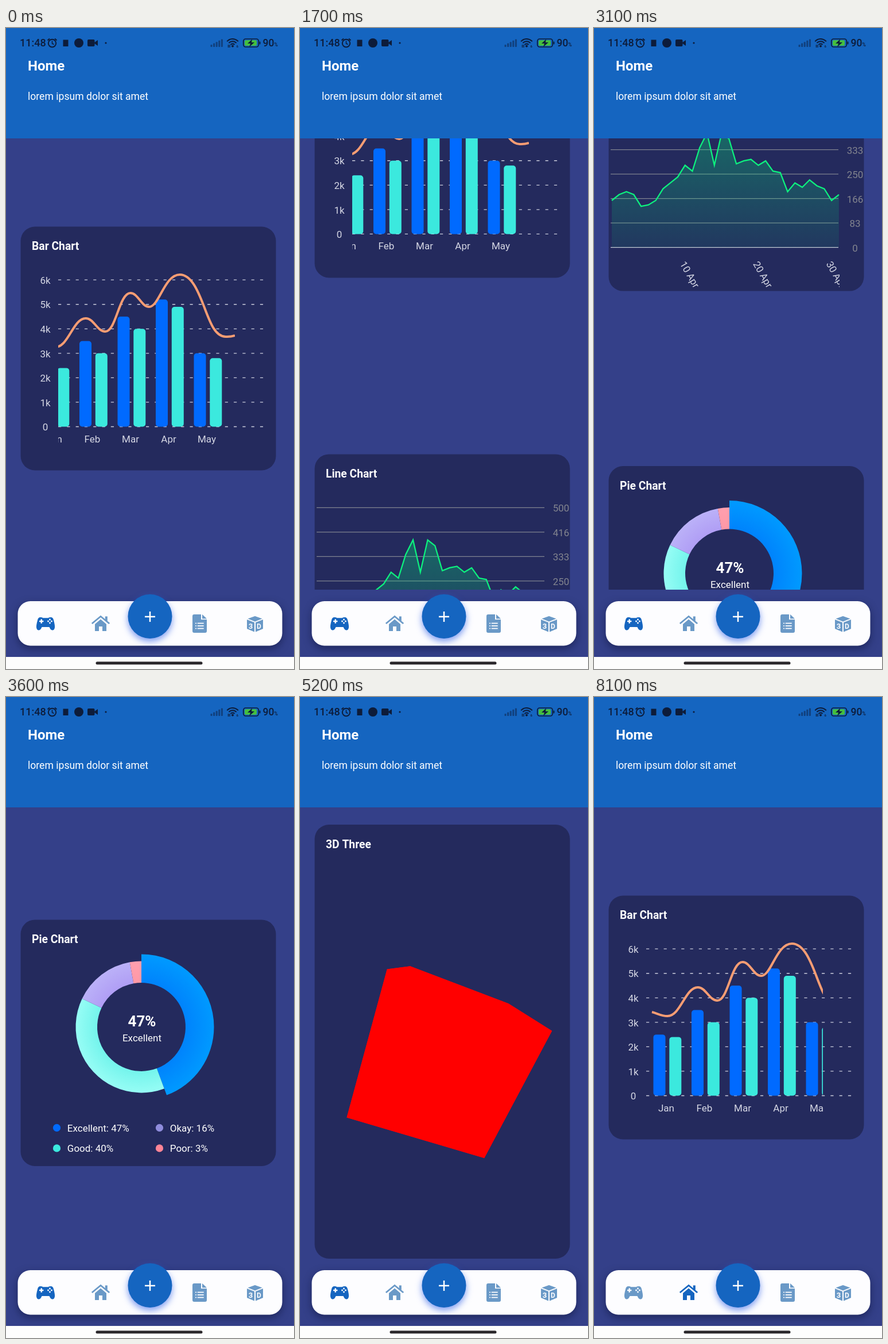
Write an HTML page with a canvas that moves like this. It is 502 px wide and 1115 px high and loops after 8200 ms.

```html
<!DOCTYPE html>
<html lang="en">
<head>
<meta charset="utf-8">
<title>Dashboard</title>
<style>
html, body { margin: 0; width: 100%; height: 100%; overflow: hidden; background: #344089; }
canvas { display: block; width: 502px; height: 1115px; }
</style>
</head>
<body>
<canvas id="stage"></canvas>
<script>
const W = 502, H = 1115, LOOP = 8200, STEP = 100;
const BG = '#344089', CARD = '#242a5d', BLUE = '#1565c0', IDLE = '#6a99c7';
const INK = '#0d1c3a', LABEL = '#d5d7e4', BAR_A = '#006aff', BAR_B = '#3be9de';
const VIEW_TOP = 192, VIEW_BOTTOM = 977, PAGE = 731, TAB_AT = 6700;

const canvas = document.getElementById('stage');
const dpr = window.devicePixelRatio || 1;
canvas.width = W * dpr;
canvas.height = H * dpr;
const c = canvas.getContext('2d');

const clamp = (v) => Math.max(0, Math.min(1, v));
const easeInOut = (u) => u * u * (3 - 2 * u);
const flick = (t, start, length) => 1 - Math.pow(1 - clamp((t - start) / length), 2.2);

function text(s, x, y, size, color, weight = 400, align = 'left') {
  c.font = `${weight} ${size}px Roboto, sans-serif`;
  c.textAlign = align;
  c.textBaseline = 'alphabetic';
  c.fillStyle = color;
  c.fillText(s, x, y);
}

function box(x, y, w, h, r, color) {
  c.beginPath();
  c.roundRect(x, y, w, h, r);
  c.fillStyle = color;
  c.fill();
}

function dot(x, y, r, color) {
  c.beginPath();
  c.arc(x, y, r, 0, Math.PI * 2);
  c.fillStyle = color;
  c.fill();
}

function poly(points, color) {
  c.beginPath();
  points.forEach(([x, y]) => c.lineTo(x, y));
  c.closePath();
  c.fillStyle = color;
  c.fill();
}

function line(points, color, width) {
  c.beginPath();
  points.forEach(([x, y]) => c.lineTo(x, y));
  c.strokeStyle = color;
  c.lineWidth = width;
  c.stroke();
}

function clipped(x, y, w, h, draw) {
  c.save();
  c.beginPath();
  c.rect(x, y, w, h);
  c.clip();
  draw();
  c.restore();
}

// Draws a card whose content uses coordinates relative to the card's top.
function card(top, height, title, draw) {
  if (top > VIEW_BOTTOM || top + height < VIEW_TOP) return;
  c.save();
  c.translate(0, top);
  box(25.5, 0, 445, height, 25, CARD);
  text(title, 45, 40.7, 19.3, '#fff', 700);
  draw();
  c.restore();
}

const MONTHS = [['Jan', 2.5, 2.4], ['Feb', 3.5, 3], ['Mar', 4.5, 4], ['Apr', 5.2, 4.9], ['May', 3, 2.8]];
const TREND = new Path2D(`M101 202.5 C110 204.5 117 209.5 128 209.5 C151 209.5 159 159.5 181 159.5
  C195 159.5 201 182.5 215 182.5 C234 182.5 239 115.5 259 115.5 C272 115.5 278 139.5 291.5 139.5
  C309 139.5 318 83.5 345 83.5 C366 83.5 378 115.5 387 138.5 C397 164.5 406 191.5 425 191.5
  Q433 192 441 189.5`);

function barChart(shift, grow) {
  const base = 348, unit = 42.55;
  for (let i = 0; i <= 6; i++) {
    const y = base - i * unit;
    c.setLineDash([5.2, 10.1]);
    line([[91, y], [449, y]], '#c9cbdb', 1.3);
    c.setLineDash([]);
    text(i ? i + 'k' : '0', 68.5, y + 6.7, 17, LABEL, 400, 'center');
  }
  clipped(91, 60, 308, 340, () => {
    c.translate(-shift, 0);
    MONTHS.forEach(([name, a, b], i) => {
      const x = 103.5 + i * 66.5;
      [[a, 0, BAR_A], [b, 27.8, BAR_B]].forEach(([v, dx, color]) => {
        const h = v * unit * grow;
        if (h > 0) box(x + dx, base - h, 21, h, Math.min(5, h / 2), color);
      });
      c.globalAlpha = clamp(grow * 2);
      text(name, x + 22.5, 375, 17, LABEL, 400, 'center');
      c.globalAlpha = 1;
    });
    c.strokeStyle = '#f89d73';
    c.lineWidth = 4;
    c.stroke(TREND);
  });
}

const SERIES = [160, 180, 190, 180, 140, 145, 160, 200, 220, 240, 280, 260, 340, 390, 280, 390,
  370, 285, 295, 300, 280, 295, 260, 255, 190, 220, 205, 230, 210, 200, 160, 180];

function lineChart() {
  const base = 348, scale = 0.51;
  const points = SERIES.map((v, i) => [31 + i * 12.77, base - v * scale]);
  for (let i = 0; i <= 6; i++) {
    const y = base - i * 42.5;
    line([[29, y], [426, y]], i ? '#7f8290' : '#c6c9d6', 1.4);
    text(String(Math.floor(i * 500 / 6)), 455, y + 7, 17, '#83858f', 400, 'center');
  }
  const fill = c.createLinearGradient(0, 148, 0, base);
  fill.addColorStop(0, 'rgba(0,240,120,.31)');
  fill.addColorStop(1, 'rgba(0,240,128,.07)');
  poly([...points, [points[31][0], base], [31, base]], fill);
  c.lineJoin = 'miter';
  line(points, '#0df07e', 2.3);
  clipped(29, 350, 399, 74, () => {
    ['10 Apr', '20 Apr', '30 Apr'].forEach((s, i) => {
      c.save();
      c.translate(166.5 + i * 127.5, 395.5);
      c.rotate(Math.PI / 3);
      text(s, 0, 5.5, 17, LABEL, 400, 'center');
      c.restore();
    });
  });
}

// label, share, inner colour, outer colour, outer radius, legend colour
const SLICES = [
  ['Excellent', 47, '#0083fc', '#009aff', 126.5, BAR_A],
  ['Good', 40, '#74f4ec', '#96fdf5', 114.5, BAR_B],
  ['Okay', 16, '#b09ef5', '#bbb1f8', 114.5, '#8f8cdc'],
  ['Poor', 3, '#ff98a6', '#ff9fae', 114.5, '#ff8496']
];

function pieChart() {
  const x = 236, y = 186.5;
  const total = SLICES.reduce((sum, s) => sum + s[1], 0);
  let from = -Math.PI / 2;
  SLICES.forEach(([name, share, inner, outer, r, key], i) => {
    const to = from + share / total * Math.PI * 2;
    const shade = c.createRadialGradient(x, y, 77, x, y, r);
    shade.addColorStop(0, inner);
    shade.addColorStop(1, outer);
    c.beginPath();
    c.arc(x, y, r, from, to);
    c.arc(x, y, 77, to, from, true);
    c.closePath();
    c.fillStyle = shade;
    c.fill();
    from = to;
    const lx = i < 2 ? 88.5 : 267.5, ly = 362 + (i % 2) * 35.5;
    dot(lx, ly, 6.6, key);
    text(`${name}: ${share}%`, lx + 18.3, ly + 6.3, 17, '#fff');
  });
  text('47%', x + 1, 186, 26, '#fff', 700, 'center');
  text('Excellent', x + 1, 211.5, 17, '#fff', 400, 'center');
}

function cube(t) {
  const a = 1.916 + 0.0006 * (Math.min(t, 6400) - 5200);
  const b = 1.567 - a;
  const sa = Math.sin(a), ca = Math.cos(a), sb = Math.sin(b), cb = Math.cos(b);
  const project = ([x, y, z]) => {
    const px = x * cb + z * sb, pz = z * cb - x * sb;
    const depth = 4 - (y * sa + pz * ca);
    return [248.5 + 425 * px / depth, 392 - 425 * (y * ca - pz * sa) / depth];
  };
  for (let axis = 0; axis < 3; axis++) {
    for (const side of [-1, 1]) {
      const face = [[-1, -1], [1, -1], [1, 1], [-1, 1]].map((corner) => {
        const p = [...corner];
        p.splice(axis, 0, side);
        return project(p);
      });
      poly(face, '#f00');
    }
  }
}

function statusBar() {
  text('11:48', 24, 32, 18, INK, 500);
  c.strokeStyle = INK;
  c.lineWidth = 2;
  c.beginPath();
  c.arc(80.5, 26.5, 6.7, 0, Math.PI * 2);
  c.stroke();
  line([[80.5, 22.5], [80.5, 27], [83.5, 28.5]], INK, 1.5);
  line([[72.5, 21.5], [76, 18.5]], INK, 2);
  line([[85, 18.5], [88.5, 21.5]], INK, 2);
  box(99.5, 20.5, 9, 11.5, 0, INK);
  dot(127, 26, 8, INK);
  box(142, 20, 12.5, 12, 2, INK);
  poly([[153, 26], [160, 21], [160, 31]], INK);
  dot(174, 26, 1.6, INK);

  for (let i = 0; i < 5; i++) {
    const h = 4 + i * 2.4;
    box(356.5 + i * 4.6, 33 - h, 3, h, 1, 'rgba(13,28,58,.5)');
  }
  for (const r of [4.5, 8.8, 13]) {
    c.beginPath();
    c.arc(395, 32, r, -Math.PI * 0.77, -Math.PI * 0.23);
    c.strokeStyle = INK;
    c.lineWidth = 2;
    c.stroke();
  }
  dot(395, 31.5, 2, INK);
  line([[387.5, 29], [387.5, 34]], INK, 1.3);
  line([[390, 29], [390, 34]], INK, 1.3);
  text('6', 401.5, 33.5, 6, INK, 500);
  c.beginPath();
  c.roundRect(413.8, 19, 26.5, 14, 4);
  c.strokeStyle = INK;
  c.lineWidth = 1.7;
  c.stroke();
  box(416, 21.2, 21, 9.6, 2, '#45bf3f');
  box(441.5, 23.5, 2, 5, 1, INK);
  poly([[429, 19.5], [421, 27], [426, 27], [424, 33], [433, 25], [428, 25]], INK);
  text('90', 447.5, 32, 17.5, INK, 500);
  text('%', 467.5, 32, 8.5, INK, 500);
}

const PAD = new Path2D(`M60 1025 Q63 1025 64.5 1026.3 H73.5 Q75 1025 78 1025 Q82 1025 83 1030
  Q85.5 1039 85 1043 Q84 1048 80.5 1047.5 Q77.5 1047 75.5 1042 H62.5 Q60.5 1047 57.5 1047.5
  Q54 1048 53 1043 Q52.5 1039 55 1030 Q56 1025 60 1025Z`);
const PAPER = new Path2D(`M328 1020 H340 V1029 H350 V1049 Q350 1052 347 1052 H328
  Q325 1052 325 1049 V1023 Q325 1020 328 1020Z M342 1020 L350 1027.5 H342Z`);
const HOUSE = [[155, 1037], [165, 1028.5], [175, 1037], [175, 1049], [168, 1049],
  [168, 1041], [162, 1041], [162, 1049], [155, 1049]];

function navBar(homeActive) {
  const white = '#fdfdff';
  c.save();
  c.shadowColor = 'rgba(10,14,50,.5)';
  c.shadowBlur = 14 * dpr;
  c.shadowOffsetY = 5 * dpr;
  box(20.5, 997, 461, 77.5, 22, white);
  c.restore();

  c.fillStyle = homeActive ? IDLE : BLUE;
  c.fill(PAD);
  box(58, 1030.8, 7.4, 2.4, 0, white);
  box(60.5, 1028.3, 2.4, 7.4, 0, white);
  [[73.5, 1032], [79.5, 1032], [76.5, 1029], [76.5, 1035]].forEach(([x, y]) => dot(x, y, 1.4, white));

  const home = homeActive ? BLUE : IDLE;
  c.lineJoin = 'miter';
  line([[149.8, 1036], [165, 1023.5], [180.2, 1036]], home, 2.8);
  box(172.8, 1023.5, 4, 8, 0, home);
  poly(HOUSE, home);

  c.fillStyle = IDLE;
  c.fill(PAPER);
  for (const y of [1035.5, 1040, 1044.5]) {
    dot(331, y, 1.1, white);
    box(333.7, y - 0.9, 11, 1.8, 0, white);
  }

  poly([[434, 1023], [446.5, 1027.5], [434, 1032.5], [421.5, 1027.5]], IDLE);
  for (const s of [-1, 1]) {
    poly([[434 + s, 1034], [434 + s * 14, 1029], [434 + s * 14, 1045], [434 + s, 1050.5]], IDLE);
  }
  text('3', 426.5, 1044.5, 13, white, 700, 'center');
  text('D', 441, 1044.5, 12, white, 700, 'center');

  c.save();
  c.shadowColor = 'rgba(40,90,230,.6)';
  c.shadowBlur = 12 * dpr;
  c.shadowOffsetY = 5 * dpr;
  dot(251, 1023.5, 38.5, BLUE);
  c.restore();
  line([[242, 1024], [260, 1024]], '#fff', 2.5);
  line([[251, 1015], [251, 1033]], '#fff', 2.5);
}

function draw(t) {
  const homeActive = t >= TAB_AT;
  const scroll = homeActive ? 0
    : PAGE * (flick(t, 1383, 1303) + flick(t, 2875, 1007) + flick(t, 4080, 1010));
  const grow = homeActive ? easeInOut(clamp((t - TAB_AT - 100) / 1100)) : 1;

  c.setTransform(dpr, 0, 0, dpr, 0, 0);
  c.fillStyle = BG;
  c.fillRect(0, 0, W, H);

  clipped(0, VIEW_TOP, W, VIEW_BOTTOM - VIEW_TOP, () => {
    card(345.5 - scroll, 424, 'Bar Chart', () => barChart(homeActive ? 0 : 42, grow));
    card(1076.5 - scroll, 424, 'Line Chart', lineChart);
    card(1805 - scroll, 428.5, 'Pie Chart', pieChart);
    card(2415 - scroll, 755, '3D Three', () => cube(t));
  });

  c.fillStyle = BLUE;
  c.fillRect(0, 0, W, VIEW_TOP);
  statusBar();
  text('Home', 38, 74, 24, '#fff', 700);
  text('lorem ipsum dolor sit amet', 38, 125, 17.6, '#fff');

  navBar(homeActive);
  c.fillStyle = '#fdfdfd';
  c.fillRect(0, 1094, W, H - 1094);
  box(156.5, 1102.3, 186, 5, 2.5, '#2c292d');
}

// The screen refreshes in steps of STEP milliseconds.
function tick() {
  const t = (performance.now() + 5) % LOOP;
  draw(Math.floor(t / STEP) * STEP);
  requestAnimationFrame(tick);
}
tick();
</script>
</body>
</html>
```
